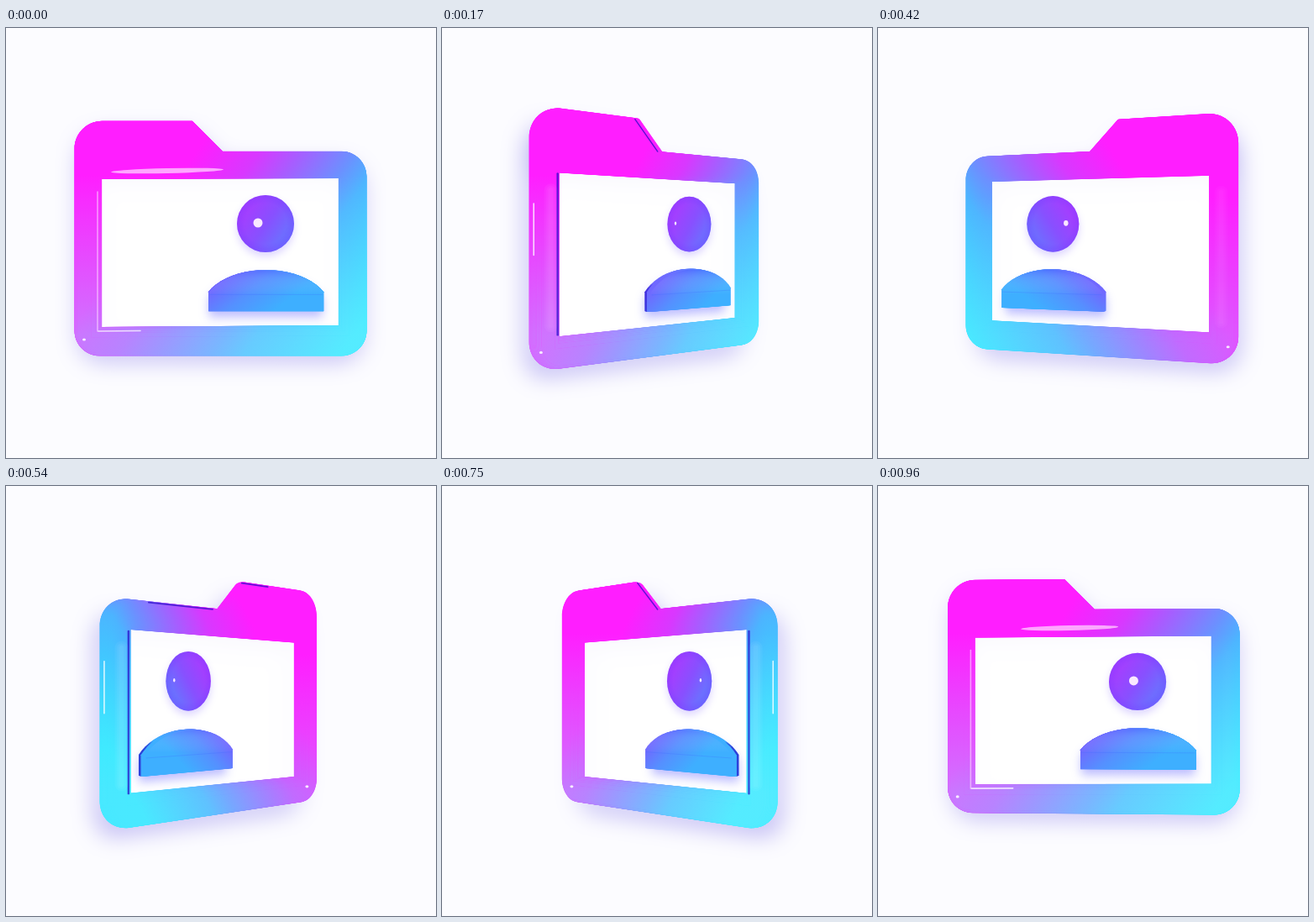
These frames come from a looping animation (512x512 px, 1 s). An HTML page with a canvas:

```html
<!DOCTYPE html>
<html lang="en">
<head>
<meta charset="utf-8">
<title>Turning glass folder</title>
<style>
html, body { margin: 0; width: 100%; height: 100%; overflow: hidden; background: #fcfcff; }
canvas { display: block; width: 100vw; height: 100vh; }
</style>
</head>
<body>
<canvas id="stage" width="512" height="512"></canvas>
<script>
const ctx = document.getElementById('stage').getContext('2d');
const CX = 256, CY = 250, DIST = 950, HALF = 11, SLICES = 16;
const FPS = 24, LOOP = 1000;

// Turn in degrees against frame count
const KEYS = [[0, 0], [4, 41.3], [8, 113], [13, 225.2], [16, 285], [21, 350.5], [23, 357], [24, 360]];
const clamp = (v, a, b) => Math.min(b, Math.max(a, v));
const ramp = (v, a, b) => { const u = clamp((v - a) / (b - a), 0, 1); return u * u * (3 - 2 * u); };

function slope(i) {
  if (i === 0 || i === KEYS.length - 1) return 3;
  const [p, q] = [KEYS[i - 1], KEYS[i + 1]];
  return (q[1] - p[1]) / (q[0] - p[0]);
}

function turnAt(n) {
  let i = 0;
  while (i < KEYS.length - 2 && n >= KEYS[i + 1][0]) i++;
  const [x0, y0] = KEYS[i], [x1, y1] = KEYS[i + 1];
  const h = x1 - x0, u = (n - x0) / h, v = 1 - u;
  return v * v * (1 + 2 * u) * y0 + u * u * (3 - 2 * u) * y1
    + h * u * v * (v * slope(i) - u * slope(i + 1));
}

function linear(x0, y0, x1, y1, stops) {
  const g = ctx.createLinearGradient(x0, y0, x1, y1);
  stops.forEach(([at, color]) => g.addColorStop(at, color));
  return g;
}

const glass = linear(-68, -47, 160, 112, [[0, '#ff1eff'], [.22, '#d838ff'], [.36, '#a85cff'],
  [.55, '#6c90ff'], [.66, '#4cb4ff'], [1, '#2cecff']]);
const liftFront = linear(0, -75, 0, 115, [[0, 'rgba(140,235,255,0)'], [1, 'rgba(140,235,255,.42)']]);
const liftBack = linear(0, -50, 0, 115, [[0, 'rgba(140,225,255,0)'], [1, 'rgba(140,225,255,.3)']]);
const bodyFill = linear(20, 36, 62, 88, [[0, '#7068ff'], [.45, '#5590ff'], [1, '#3eafff']]);
const headFill = linear(26, -34, 80, 4, [[0, '#a83cff'], [.5, '#8850ff'], [1, '#6578ff']]);
const NAVY = 'rgba(36,10,200,';

let cos, sin;

function project(x, y, z) {
  const k = DIST / (DIST - (z * cos - x * sin));
  return [CX + (x * cos + z * sin) * k, CY + y * k, k];
}

const outer = i => [[-174 + i, -139 + i, 33 - i], [-34 - .41 * i, -139 + i, 0], [2 - .41 * i, -103 + i, 0],
  [173 - i, -103 + i, 30 - i], [173 - i, 140 - i, 30 - i], [-174 + i, 140 - i, 30 - i]];
const hole = i => [[-142 - i, -70 - i, 0], [140 + i, -71 - i, 0], [140 + i, 104 + i, 0], [-142 - i, 106 + i, 0]];

function addShape(path, pts, z) {
  const at = (p, q, r) => {
    const d = Math.hypot(q[0] - p[0], q[1] - p[1]);
    return project(p[0] + (q[0] - p[0]) * r / d, p[1] + (q[1] - p[1]) * r / d, z);
  };
  pts.forEach((p, i) => {
    const a = pts[(i + pts.length - 1) % pts.length], b = pts[(i + 1) % pts.length], r = p[2];
    const s = at(p, a, r);
    i ? path.lineTo(s[0], s[1]) : path.moveTo(s[0], s[1]);
    if (r) {
      const c1 = at(p, a, r * .45), c2 = at(p, b, r * .45), e = at(p, b, r);
      path.bezierCurveTo(c1[0], c1[1], c2[0], c2[1], e[0], e[1]);
    }
  });
  path.closePath();
}

function bodyPath(z, i) {
  const path = new Path2D(), l = -15 + i, r = 122 - i, b = 87 - i / 2;
  const mid = (l + r) / 2, w = (r - l) / 2;
  path.moveTo(...project(l, b, z).slice(0, 2));
  for (let k = 0; k <= 20; k++) {
    const a = Math.PI * (.15 + .7 * k / 20), e = Math.cos(.15 * Math.PI);
    const lift = (Math.sin(a) - Math.sin(.15 * Math.PI)) / (1 - Math.sin(.15 * Math.PI));
    path.lineTo(...project(mid - w * Math.cos(a) / e, 64 - (26 - i) * lift, z).slice(0, 2));
  }
  path.lineTo(...project(r, b, z).slice(0, 2));
  path.closePath();
  return path;
}

// Colours follow the turned plane while the path stays in screen space
function paint(path, fill, z, rule = 'nonzero') {
  let a = (project(170, 0, z)[0] - project(-170, 0, z)[0]) / 340;
  if (Math.abs(a) < .04) a = a < 0 ? -.04 : .04;
  const m = new DOMMatrix([a, 0, 0, 1, project(0, 0, z)[0], CY]);
  const local = new Path2D();
  local.addPath(path, m.inverse());
  ctx.save();
  ctx.setTransform(m);
  ctx.fillStyle = fill;
  ctx.fill(local, rule);
  ctx.restore();
}

function shadow(color, blur, x, y) {
  ctx.shadowColor = color;
  ctx.shadowBlur = blur;
  ctx.shadowOffsetX = x;
  ctx.shadowOffsetY = y;
}

function line(pts, z, color, width) {
  ctx.beginPath();
  pts.forEach(([x, y]) => { const p = project(x, y, z); ctx.lineTo(p[0], p[1]); });
  ctx.strokeStyle = color;
  ctx.lineWidth = width;
  ctx.stroke();
}

function oval(x, y, rx, ry, color) {
  ctx.beginPath();
  ctx.ellipse(x, y, rx, ry, 0, 0, 7);
  ctx.fillStyle = color;
  ctx.fill();
}

const nearDark = (edge, near, depth, alpha) => linear(edge, 0, edge - near * depth, 0,
  [[0, NAVY + alpha + ')'], [.5, NAVY + alpha * .7 + ')'], [1, NAVY + '0)']]);

function drawHead(phi, steep) {
  const [x, y, k] = project(53, -17, 0);
  const rx = k * Math.hypot(34 * cos, 13 * sin), ry = 34 * k;
  const path = new Path2D();
  path.ellipse(x, y, rx, ry, 0, 0, 7);
  ctx.save();
  shadow('rgba(120,90,255,.25)', 10, 0, 5);
  ctx.globalAlpha = 1 - .4 * steep;
  paint(path, headFill, 0);
  ctx.restore();
  ctx.save();
  ctx.translate(x, y);
  ctx.scale(rx / ry, 1);
  const rim = ctx.createRadialGradient(0, 0, ry * .72, 0, 0, ry);
  rim.addColorStop(0, 'rgba(120,60,255,0)');
  rim.addColorStop(1, 'rgba(120,60,255,.4)');
  oval(0, 0, ry, ry, rim);
  ctx.restore();
  if (steep > 0) line([[53, -45], [53, 11]], 0, 'rgba(90,50,255,' + .45 * steep + ')', 2);
  const dx = clamp(-9 - 1.45 * phi, -.63 * rx, .5 * rx);
  const flat = 1 - ramp(Math.abs(phi), 10, 32);
  oval(x + dx, y - 1, 1.2 + 4.3 * flat, 2.2 + 3.3 * flat, 'rgba(255,240,255,.95)');
}

function drawLights(phi, side, near, z, steep) {
  const slant = Math.abs(sin);
  const bump = clamp(1 - Math.abs(Math.abs(phi) - 43) / 20, 0, 1);
  const inner = near < 0 ? -142 : 140;
  if (bump > 0) {
    const ink = NAVY + .8 * bump + ')';
    line([[inner, -69], [inner, 104]], 0, ink, 2.4);
    if (side > 0) line([[-34, -138], [1, -103]], 0, ink, 1.5);
    else {
      line([[14, -102], [112, -102]], 0, ink, 1.8);
      line([[-36, -138], [-84, -138]], 0, ink, 1.8);
    }
  }
  // Soft sheen along the near upright bar
  const bar = near * 158;
  for (const w of [16, 11, 6]) line([[bar, -50], [bar, 92]], z, 'rgba(255,255,255,' + .06 * slant + ')', w);
  if (slant > .4) line([[near * 172, -36], [near * 172, 18 - 28 * steep]], 0, 'rgba(255,255,255,.8)', 1.6);
  if (steep > 0) {
    const marks = near < 0 ? [[-152, 121], [-158, -128]] : [[156, 122], [156, -88]];
    marks.forEach(([x, y], i) => {
      line([[x - 10, y + 8], [x + 6, y + 3], [x + 15, y - 8]], z, NAVY + (i && near < 0 ? .3 : .7) * steep + ')', 3);
      line([[x - 12, y], [x + 12, y - 4]], z, 'rgba(70,50,255,' + .45 * steep + ')', 4);
    });
  }
  const speck = project(-163, 121, 0);
  oval(speck[0], speck[1], 2, 1.6, 'rgba(255,255,255,.85)');

  const facing = side > 0 ? 1 - ramp(Math.abs(phi), 10, 22) : 0;
  if (!facing) return;
  ctx.globalAlpha = facing;
  line([[-147, -55], [-147, 111]], 0, 'rgba(255,215,255,.6)', 1.6);
  if (phi > -6) {
    line([[-146, 111], [-96, 110.5]], 0, 'rgba(255,255,255,.75)', 1.6);
    const p = project(-64 - 12 * phi, -80 + phi * .4, 0);
    ctx.save();
    ctx.translate(p[0], p[1]);
    ctx.rotate(-.022);
    oval(0, 0, 67 + 3 * phi, 3, 'rgba(255,190,255,.85)');
    ctx.restore();
  } else {
    const from = clamp(-20 - 6.5 * phi, -60, 130);
    line([[from, -82], [145, -83], [146, -42]], 0, 'rgba(255,245,255,.9)', 2.4);
  }
  ctx.globalAlpha = 1;
}

function draw(n) {
  const turn = turnAt(n), rad = turn * Math.PI / 180;
  cos = Math.cos(rad);
  sin = Math.sin(rad);
  const side = cos >= 0 ? 1 : -1, near = sin > 0 ? -1 : 1;
  const phi = ((turn + 90) % 180) - 90;
  const slant = Math.abs(sin), steep = ramp(slant, .8, .93);
  const edge = near < 0 ? -174 : 173, end = near < 0 ? -15 : 122;

  ctx.fillStyle = '#fcfcff';
  ctx.fillRect(0, 0, 512, 512);
  ctx.lineCap = ctx.lineJoin = 'round';

  for (let k = 0; k <= SLICES; k++) {
    const u = k / SLICES * 2 - 1, z = u * HALF * side;
    const round = 1 - Math.sqrt(1 - u * u), inset = 4.5 * round;
    const path = new Path2D(), gap = new Path2D();
    addShape(path, outer(inset), z);
    addShape(gap, hole(HALF * round), z);
    path.addPath(gap);
    if (k === 0) {
      ctx.save();
      shadow('rgba(100,85,225,.46)', 28, near * side * slant * 8, 11 + 6 * slant);
      paint(path, glass, z, 'evenodd');
      ctx.restore();
      ctx.fillStyle = 'rgba(255,255,255,.9)';
      ctx.fill(gap);
    }
    paint(path, glass, z, 'evenodd');
    paint(path, side > 0 ? liftFront : liftBack, z, 'evenodd');
    if (u < -.3 && steep > 0) paint(path, nearDark(edge, near, 14, .75 * steep), z, 'evenodd');

    if (Math.abs(u) <= .5) {
      const body = bodyPath(z, inset);
      ctx.save();
      if (u === -.5) shadow('rgba(90,90,255,.4)', 12, 0, 8);
      paint(body, bodyFill, z);
      ctx.restore();
      const dark = ramp(slant, .4, .7);
      if (u < -.2 && dark > 0) paint(body, nearDark(end, near, 12, .8 * dark), z);
      if (u === .5) {
        paint(body, linear(0, 38, 0, 87, [[0, 'rgba(60,80,255,.35)'], [.25, 'rgba(160,170,255,.15)'],
          [.6, 'rgba(255,255,255,0)'], [1, 'rgba(120,210,255,' + .35 * steep + ')']]), z);
        line([[-13, 67], [120, 67]], z, 'rgba(60,110,255,.25)', 1);
        if (steep > 0) paint(body, 'rgba(215,215,255,' + .3 * steep + ')', z);
      }
    }
    if (k === SLICES / 2) drawHead(phi, steep);
    if (k === SLICES) {
      if (steep > 0) paint(path, 'rgba(255,255,255,' + .14 * steep + ')', z, 'evenodd');
      drawLights(phi, side, near, z, steep);
    }
  }
}

let shown = -1;
function tick() {
  const t = performance.now() % LOOP;
  const n = Math.min(FPS - 1, Math.floor((t + 6) * FPS / LOOP));
  if (n !== shown) draw(shown = n);
  requestAnimationFrame(tick);
}
tick();
</script>
</body>
</html>
```
